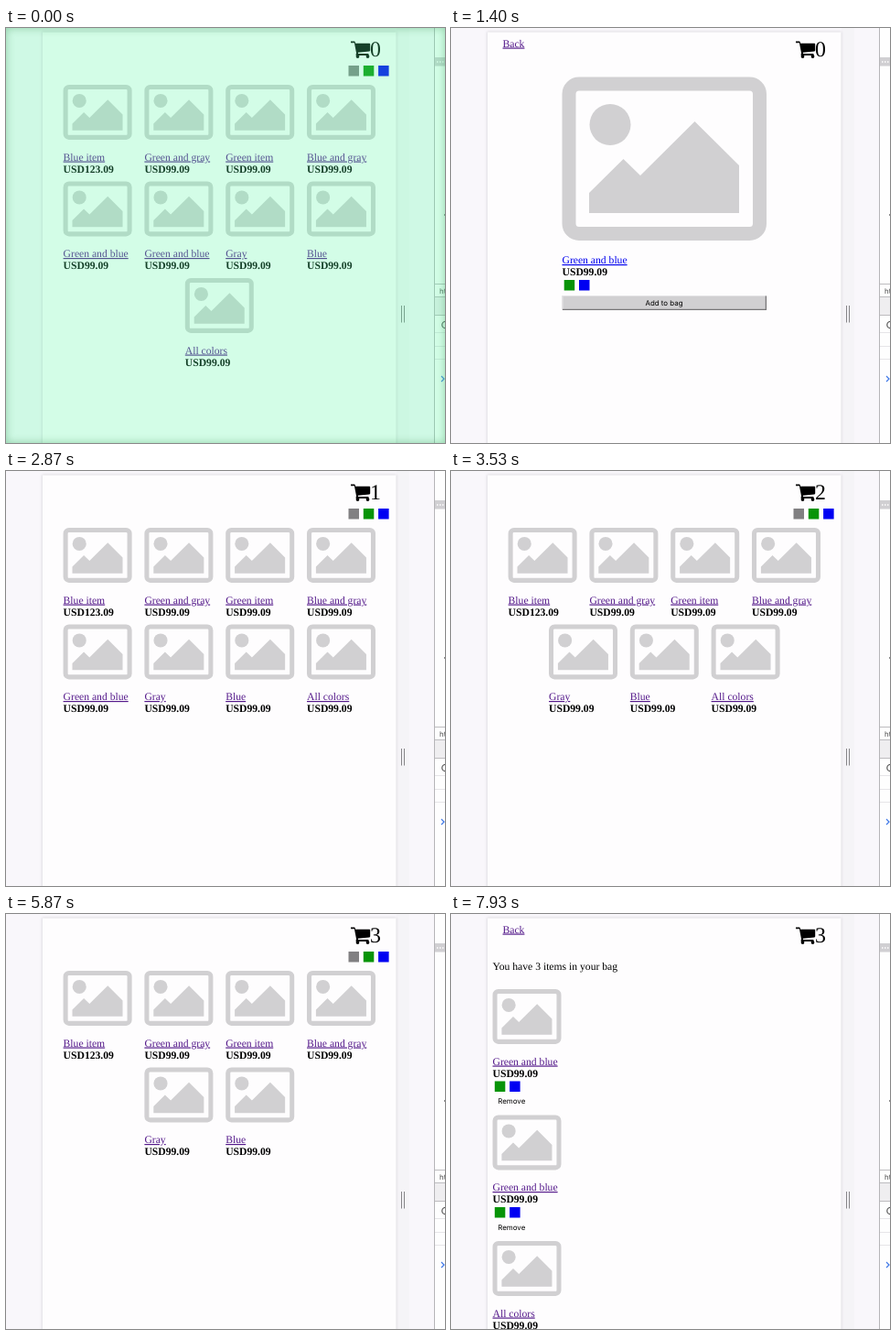
These frames come from a looping animation (480x453 px, 8000 ms). An HTML page:

```html
<!DOCTYPE html>
<html lang="en">
<head>
<meta charset="utf-8">
<title>Shop</title>
<style>
  html, body { margin: 0; width: 100%; height: 100%; overflow: hidden; background: #f9f7fb; }
  svg { position: absolute; left: 0; top: 0; display: block; }
  text { font: 11.65px "Liberation Serif", "Times New Roman", serif; text-rendering: geometricPrecision; }
  .link { fill: #551a8b; text-decoration: underline; }
  .new { fill: #0000ee; }
  .price { font-weight: bold; }
  .count { font-size: 23.8px; }
  .ui { font: 7.9px Inter, Roboto, sans-serif; }
  #tint {
    position: absolute; left: 0; top: 0; width: 480px; height: 453px;
    background: rgba(83, 255, 163, .25);
    box-shadow: inset 0 0 10px rgba(50, 140, 75, .4);
  }
</style>
</head>
<body>
<svg width="480" height="453" viewBox="0 0 480 453">
  <defs>
    <filter id="soft" x="-5%" y="-5%" width="110%" height="110%"><feGaussianBlur stdDeviation="1.5"/></filter>
    <g id="pic" fill="#d1d0d2">
      <rect x="7.5" y="7.5" width="208.5" height="163.5" rx="11" fill="none" stroke="#d1d0d2" stroke-width="15"/>
      <circle cx="52.5" cy="52" r="22.5"/>
      <path d="M29.5 126.5 67 89.5 85.5 107.5 145 48.5 193.5 96.5V148.5H29.5Z"/>
    </g>
  </defs>

  <rect width="480" height="453" fill="#f9f7fb"/>
  <rect x="427" width="14" height="453" fill="#f5f4f7"/>
  <rect x="39.5" y="4" width="387.5" height="460" fill="#d8d6dc" filter="url(#soft)"/>
  <rect x="40" y="4.5" width="386.5" height="449" fill="#fefdfe"/>
  <path d="M432.5 303V321.500M435.500 303V321.500" stroke="#858487"/>

  <rect x="469" width="11" height="453" fill="#fefefe"/>
  <path d="M468.500 0V453" stroke="#b5b4b7"/>
  <rect x="469" y="32" width="11" height="9.500" fill="#d0cfd2"/>
  <path d="M471 37h1.500m1.500 0h1.500m1.500 0h1.500" stroke="#fff" stroke-width="1.500"/>
  <circle cx="480" cy="204" r="1" fill="#666"/>
  <rect x="469" y="294" width="11" height="19" fill="#efeef0"/>
  <path d="M469 279.500h11M469 293.500h11M469 313.500h11" stroke="#bdbcbf"/>
  <path d="M469 332.500h11M469 347.500h11M469 361.500h11" stroke="#e6e5e8"/>
  <text class="ui" x="474" y="289.500" fill="#444">ht</text>
  <circle cx="480.500" cy="324" r="3.700" fill="none" stroke="#555" stroke-width="1.200"/>
  <path d="m476 380 3 3-3 3" fill="none" stroke="#3f78e8" stroke-width="1.200"/>

  <path d="M377 14.500h3.800q.8 0 1 1l.2 1.200h15.400q.8 0 .8.800v7q0 .8-.8.900l-12.600 1.400.3 1.200h11.300v1.900h-13q-.9 0-.9-.9l.6-1.600-2.200-11.100h-3.900z"/>
  <circle cx="384.500" cy="31" r="1.900"/>
  <circle cx="395.500" cy="31" r="1.900"/>
  <text id="count" class="count" x="398" y="31"></text>
  <g id="page"></g>
</svg>
<div id="tint"></div>

<script>
const LOOP = 8000, FADE = 660;
const COLORS = { gray: '#818082', green: '#089408', blue: '#0000f2' };
const GB = 'Green and blue', ALL = 'All colors';
const SWATCHES = { [GB]: ['green', 'blue'], [ALL]: ['gray', 'blue', 'green'] };
const FIRST = ['Blue item', 'Green and gray', 'Green item', 'Blue and gray'];
const stock = [
  [...FIRST, GB, GB, 'Gray', 'Blue', ALL],
  [...FIRST, GB, 'Gray', 'Blue', ALL],
  [...FIRST, 'Gray', 'Blue', ALL],
  [...FIRST, 'Gray', 'Blue']
];

const text = (x, y, s, cls = '') => `<text x="${x}" y="${y}" class="${cls}">${s}</text>`;
const swatches = (x, y, names) => names.map((n, i) =>
  `<rect x="${x + i * 16.3}" y="${y}" width="11.5" height="11.5" fill="${COLORS[n]}"/>`).join('');
const picture = (x, y, scale) =>
  `<use href="#pic" transform="translate(${x} ${y}) scale(${scale})"/>`;
const label = (x, y, name, cls) => text(x, y, name, cls) +
  text(x, y + 13, name === 'Blue item' ? 'USD123.09' : 'USD99.09', 'price');
const card = (x, y, name) => picture(x, y, .3356) + label(x, y + 82.5, name, 'link');
const back = text(56.5, 20.5, 'Back', 'link');

function listPage(bought) {
  const items = stock[bought], pitch = 88.8;
  return swatches(374.5, 41, ['gray', 'green', 'blue']) + items.map((name, i) => {
    const row = Math.floor(i / 4);
    const inRow = Math.min(4, items.length - row * 4);
    const x = 233.3 + (i % 4 - inRow / 2) * pitch + 6.9;
    return card(x, 62 + row * 105.5, name);
  }).join('');
}

function detailPage(name) {
  return back + picture(121.5, 53.5, 1) + label(121.5, 257, name, 'link new') +
    swatches(123.7, 275, SWATCHES[name]) +
    `<rect x="121.5" y="292" width="223.5" height="16" fill="#d1d0d2"/>
     <path d="M122 307.500V292.500H345" fill="none" stroke="#e4e3e5"/>
     <path d="M122 307.400H344.400V292.500" fill="none" stroke="#777678" stroke-width="1.300"/>
     <text x="233" y="303" class="ui" text-anchor="middle">Add to bag</text>`;
}

function bagPage() {
  return back + text(45.5, 61, 'You have 3 items in your bag') + [GB, GB, ALL].map((name, i) => {
    const y = 82 + i * 137.5;
    return card(45.5, y, name) + swatches(47.8, y + 100.5, SWATCHES[name]) +
      text(51.3, y + 125, 'Remove', 'ui');
  }).join('');
}

// start time, items in bag, page content
const scenes = [
  [0, 0, listPage(0)],
  [1270, 0, detailPage(GB)],
  [2200, 1, listPage(1)],
  [3000, 1, detailPage(GB)],
  [3470, 2, listPage(2)],
  [4070, 2, detailPage(ALL)],
  [4930, 3, listPage(3)],
  [7270, 3, bagPage()]
];

const page = document.getElementById('page');
const count = document.getElementById('count');
const tint = document.getElementById('tint');
let shown = null;

function draw(t) {
  const scene = scenes.filter(s => s[0] <= t).pop();
  if (scene !== shown) {
    shown = scene;
    count.textContent = scene[1];
    page.innerHTML = scene[2];
  }
  tint.style.opacity = Math.max(0, 1 - t / FADE);
}

const start = performance.now();
function tick() {
  draw((performance.now() - start) % LOOP);
  requestAnimationFrame(tick);
}
draw(0);
requestAnimationFrame(tick);
</script>
</body>
</html>
```
